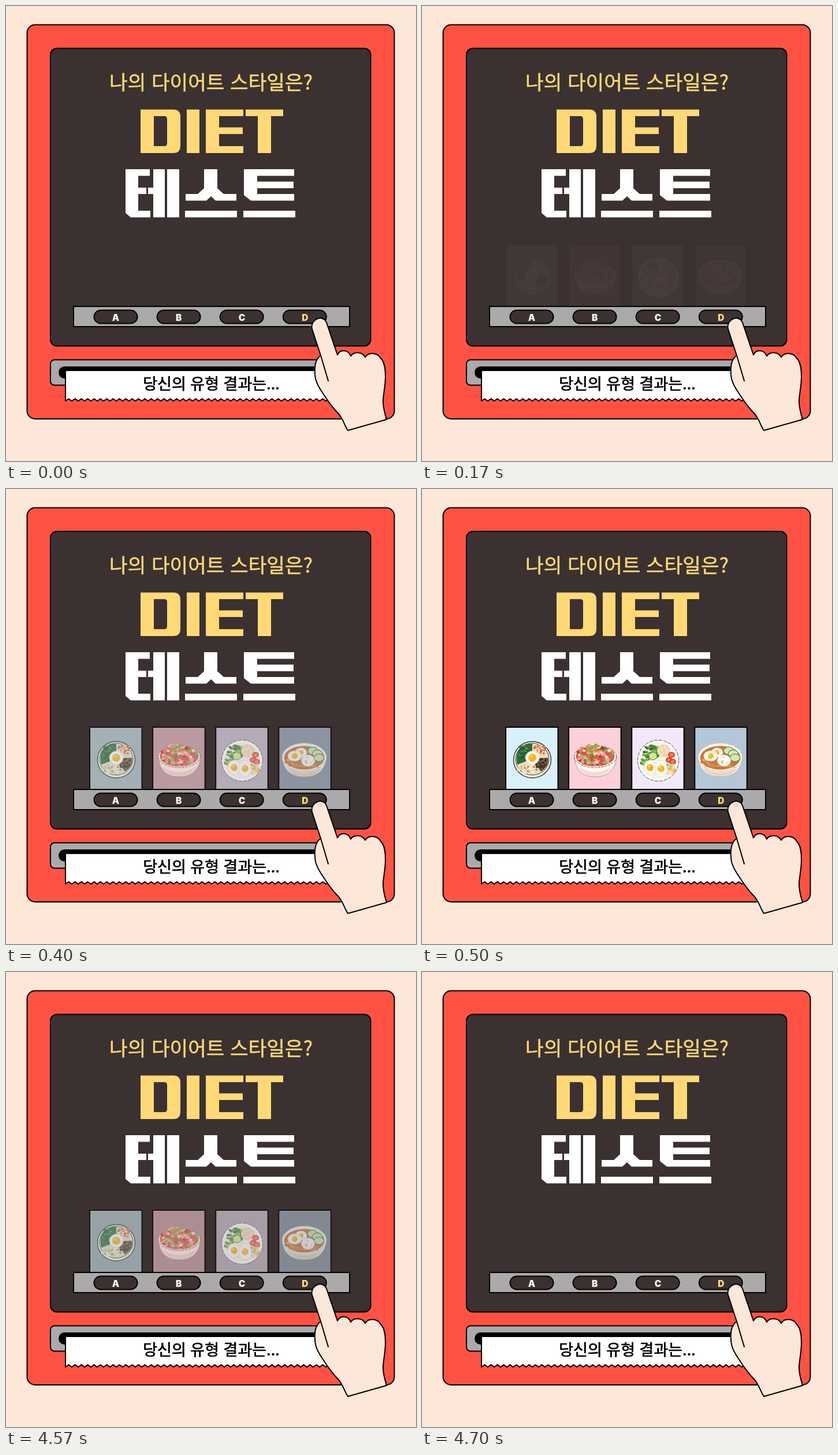
An HTML page that plays this animation: 710x789 px, repeating every 5.01 s.

```html
<!DOCTYPE html>
<html lang="ko">
<head>
<meta charset="utf-8">
<title>DIET 테스트</title>
<style>
html, body { margin: 0; width: 100%; height: 100%; overflow: hidden; background: #fce7d9; }
svg { display: block; width: 710px; height: 789px; }
text { font-family: "Noto Sans CJK KR", "Noto Sans CJK JP", "Noto Sans CJK", sans-serif; text-anchor: middle; }
.line { stroke: #000; stroke-width: 2; stroke-linejoin: round; stroke-linecap: round; }
.key { font: 900 15.5px Inter, "Noto Sans", sans-serif; fill: #fff; }
</style>
</head>
<body>
<svg viewBox="0 0 710 789" xmlns="http://www.w3.org/2000/svg">
  <rect width="710" height="789" fill="#fce7d9"/>
  <rect class="line" x="36.5" y="32.5" width="636" height="683.5" rx="14" fill="#ff5242"/>
  <rect class="line" x="77" y="73.5" width="554.5" height="516" rx="11" fill="#3b3130"/>

  <text x="355" y="144.5" font-size="34.4" fill="#fed976" stroke="#fed976" stroke-width=".5">나의 다이어트 스타일은?</text>
  <g role="img" aria-label="DIET" fill="#fed976" fill-rule="evenodd">
    <path d="M233 179.5H290Q302 179.5 302 192V242Q302 255 290 255H233ZM256 191V243H274Q279 243 279 238V196Q279 191 274 191Z"/>
    <path d="M313 179.5H335V255H313Z"/>
    <path d="M346 179.5H411V191H369V210.5H410V222H369V243H411V255H346Z"/>
    <path d="M415 179.5H480V191H459V255H436V191H415Z"/>
  </g>
  <g role="img" aria-label="테스트" fill="#fff">
    <path d="M207 283H249V294.5H229V315H243V326H229V355H250V366.5H216L207 359Z"/>
    <path d="M255 283H275V366.5H255V326H246V315H255Z"/>
    <path d="M279 283H300V366.5H279Z"/>
    <path d="M343 283H366V316L377 326H399V337.5H363L355 330L347 337.5H311V326H332L343 316Z"/>
    <path d="M310 355H400V366.5H310Z"/>
    <path d="M412 283H499V294.5H435V304.5H498V316H435V326H499V337.5H424L412 328Z"/>
    <path d="M411 355H501V366.5H411Z"/>
  </g>

  <g id="cards"></g>

  <rect class="line" x="117" y="521" width="478" height="35" fill="#aaa"/>
  <g id="keys"></g>

  <rect class="line" x="77" y="613.5" width="554" height="44" rx="7" fill="#aaa"/>
  <rect x="91" y="625" width="520" height="21" rx="10.5"/>
  <path id="paper" class="line" fill="#fff"/>
  <text x="355.5" y="664.5" font-size="27" stroke="#000" stroke-width=".7">당신의 유형 결과는...</text>

  <g class="line" fill="#fce7d9">
    <path d="M574 605C578 595 592 595 597 607C602 599 617 599 622 609C627 600 643 600 649 611C656 618 657 630 657 643C657 661 653 674 653 686C653 697 656 707 659 717L592 736C585 725 583 714 575 706C563 694 556 683 549 672C541 660 535 650 535 637C534 623 536 612 545 606L530 560C526 543 549 534 555 549Z"/>
    <path d="M545 606L558 650" fill="none"/>
  </g>
</svg>

<script>
const LOOP = 5010, FRAME = 100 / 3;
const $ = id => document.getElementById(id);

function add(parent, tag, attrs, text) {
  const el = document.createElementNS('http://www.w3.org/2000/svg', tag);
  for (const k in attrs) el.setAttribute(k, attrs[k]);
  if (text) el.textContent = text;
  return parent.appendChild(el);
}

let seed = 7;
const rnd = () => (seed = seed * 16807 % 2147483647) / 2147483647;

const oval = (g, cx, cy, rx, ry, fill, more) =>
  add(g, 'ellipse', { cx, cy, rx, ry, fill, ...more });
const path = (g, d, fill, more) => add(g, 'path', { d, fill, ...more });

// Loose pieces spread evenly inside an ellipse
function scatter(g, cx, cy, rx, ry, n, size, colors) {
  for (let i = 0; i < n; i++) {
    const a = rnd() * Math.PI * 2, r = Math.sqrt(rnd()), s = size * (.7 + rnd() * .6);
    oval(g, cx + Math.cos(a) * r * rx, cy + Math.sin(a) * r * ry, s, s * .8,
      colors[Math.floor(rnd() * colors.length)]);
  }
}

function egg(g, x, y, rx, ry, yolk) {
  oval(g, x, y, rx, ry, '#fffdf6', { stroke: '#ded5c5', 'stroke-width': .7 });
  oval(g, x, y, yolk, yolk, '#f8b51c');
  oval(g, x - yolk * .3, y - yolk * .35, yolk * .35, yolk * .3, '#ffdb63');
}

function slice(g, x, y, rx, ry, rim, flesh) {
  oval(g, x, y, rx, ry, flesh, { stroke: rim, 'stroke-width': 1.4 });
  oval(g, x, y, rx * .4, ry * .4, 'none', { stroke: rim, 'stroke-width': .5, 'stroke-dasharray': '1 1.5' });
}

function riceBowl(g) {
  oval(g, 191, 469.5, 32.5, 31.5, '#f6f0e1', { stroke: '#30302c', 'stroke-width': 1.4 });
  oval(g, 191, 468.5, 29, 27.5, '#e9dcc0', { stroke: '#3c3a33', 'stroke-width': 1 });
  path(g, 'M191 468L165 478Q160 458 172 447Q182 440 191 442Z', '#2f6b3a');
  scatter(g, 175, 458, 9, 13, 34, 2, ['#24582f', '#3b8345', '#1c4629', '#58994f']);
  scatter(g, 204, 453, 12, 9, 50, 1.7, ['#e9662e', '#f6a65b', '#f5d8a4', '#d94b2b', '#f8ead0']);
  path(g, 'M191 468L218 466Q221 480 206 490Z', '#59402f');
  scatter(g, 207, 477, 10, 9, 38, 2, ['#433126', '#705039', '#342a24', '#846247']);
  scatter(g, 183, 486, 17, 8, 60, 1.8, ['#fff3d6', '#d8bf8e', '#f5e5bf', '#a68c62']);
  egg(g, 191, 466, 12, 11.5, 7);
}

function saladBowl(g) {
  path(g, 'M263.5 464C266 487 278 499 300 499S335 487 337 464Z', '#fff8f1', { stroke: '#a78f86', 'stroke-width': 1 });
  path(g, 'M271 482Q299 500 330 481Q322 497 300 498Q281 498 271 482Z', '#efdcd2');
  oval(g, 300, 464, 36.5, 19, '#fff4eb', { stroke: '#65463e', 'stroke-width': 1, 'stroke-dasharray': '4 2' });
  oval(g, 300, 463, 33.5, 18, '#d65a45');
  scatter(g, 300, 461, 32, 18, 110, 3,
    ['#df4547', '#ef7656', '#f2a061', '#5b9e3b', '#89bd50', '#f2a19b', '#fae1c7', '#b93340']);
  scatter(g, 313, 465, 15, 11, 14, 3.4, ['#ee4d59', '#f7a5a6', '#78b348', '#fbe7d7']);
  scatter(g, 296, 449, 20, 6, 18, 2.8, ['#4d9135', '#76b344', '#ef8453']);
}

function eggPlate(g) {
  oval(g, 409, 471, 35.5, 35.5, '#fffdf9', { stroke: '#4f4b45', 'stroke-width': 1, 'stroke-dasharray': '6 2' });
  oval(g, 409, 471, 31, 31, '#f7f1e8');
  scatter(g, 397, 455, 15, 11, 50, 3.2, ['#3d8530', '#67a83c', '#8dc257', '#2f6f2c']);
  scatter(g, 386, 470, 7, 10, 20, 2.8, ['#63a43c', '#9aca5b', '#41882f']);
  slice(g, 400, 463, 7, 6.5, '#70a83c', '#d9e9a0');
  oval(g, 418, 454, 11, 10, '#f4dfb9', { stroke: '#d7b982', 'stroke-width': 1 });
  scatter(g, 418, 454, 8, 7, 24, 1, ['#fff3d7', '#dfc18e']);
  for (const [x, y] of [[432, 461], [428, 470], [434, 473]]) {
    oval(g, x, y, 6, 5, '#df3f2c');
    oval(g, x, y, 3.7, 3, '#f57a57');
  }
  scatter(g, 430, 486, 8, 10, 34, 2.5, ['#f3d392', '#e8b35e', '#9cbc54', '#fbe9bd']);
  egg(g, 395, 483, 11, 12.5, 6);
  egg(g, 414, 485, 10.5, 14, 6);
  scatter(g, 404, 485, 16, 11, 9, .6, ['#6a6045']);
}

function noodleBowl(g) {
  path(g, 'M478 465C480 488 494 499 516.5 499S553 488 555 465Z', '#fbf2e6', { stroke: '#b8a390', 'stroke-width': .8 });
  path(g, 'M486 483Q516 500 547 483Q537 498 517 498Q496 498 486 483Z', '#e7d4c1');
  oval(g, 516.5, 465, 38.5, 24.5, '#fff9ee', { stroke: '#c6b5a2', 'stroke-width': .8 });
  oval(g, 516.5, 466, 35, 20.5, '#cf7537');
  for (let i = 0; i < 8; i++)
    path(g, `M${485 + i * 2} ${467 + i * 2}Q${505 + i * 2} ${486 - i} ${535 + i} ${476 + i}`, 'none',
      { stroke: i % 2 ? '#f0b66f' : '#b95d29', 'stroke-width': 1 });
  scatter(g, 493, 473, 10, 8, 16, 1.4, ['#e69b50', '#b95c2b', '#f1ba73']);
  for (const [x, y] of [[531, 454], [539, 459], [542, 466]])
    slice(g, x, y, 8.5, 6.5, '#65994a', '#deebb9');
  egg(g, 511, 457, 10, 8, 4);
  egg(g, 500, 463, 12, 9, 5);
  oval(g, 523, 471, 11.5, 10, '#fffaf2', { stroke: '#dfd2c4', 'stroke-width': .7 });
  scatter(g, 523, 471, 8, 6, 9, .9, ['#df6b5c', '#b8a798']);
}

// Opacity table: time in ticks, value, steps to the next row
const FADE = [
  [0, 0, 3], [3, .1, 3], [6, 0, 9], [15, 1, 1],
  [137, 1, 1], [137, .59, 4], [141, 0, 1]
];
const fade = FADE.map(([f, opacity, n]) => ({
  offset: Math.max(0, f * FRAME - 1) / LOOP, opacity, easing: `steps(${n}, end)`
})).concat({ offset: 1, opacity: 0 });

const blink = el => el.animate(fade, { duration: LOOP, iterations: Infinity });

[
  ['A', '#d9f1fa', riceBowl],
  ['B', '#fbd0d9', saladBowl],
  ['C', '#f1e9fb', eggPlate],
  ['D', '#b4c7d9', noodleBowl]
].forEach(([name, fill, food], i) => {
  const x = 145 + i * 109.1;
  blink(add($('cards'), 'rect', { class: 'line', x, y: 413, width: 90.5, height: 112, fill }));
  const dish = add($('cards'), 'g', {});
  food(dish);
  blink(dish);

  add($('keys'), 'rect', {
    class: 'line', x: 152.5 + i * 109.1, y: 527.5, width: 75, height: 23, rx: 11.5, fill: '#3b3130'
  });
  const key = add($('keys'), 'text', { class: 'key', x: 190 + i * 109.3, y: 546 }, name);
  if (name === 'D') key.style.fill = '#fed976';
});

let edge = 'M606 632H103V685';
for (let x = 108.5, up = true; x <= 606; x += 5.5, up = !up) edge += `L${x} ${up ? 681 : 685}`;
$('paper').setAttribute('d', edge + 'Z');
</script>
</body>
</html>
```
